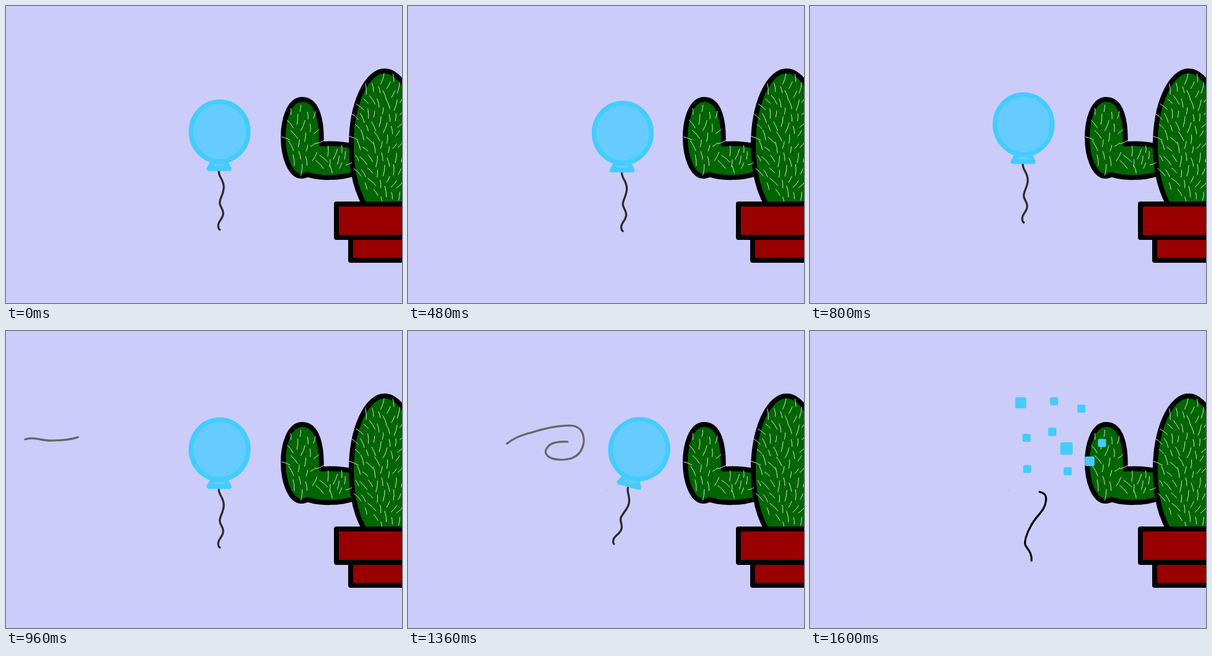
These frames come from a looping animation (640 px wide and 480 px high, 1.8 s). An HTML page:

```html
<!DOCTYPE html>
<html lang="en">
<head>
<meta charset="utf-8">
<title>Balloon and cactus</title>
<style>
html, body { margin: 0; width: 100%; height: 100%; overflow: hidden; background: #ccccfa; }
svg { display: block; width: 100%; height: 100%; }
path { stroke-linecap: round; stroke-linejoin: round; }
.outline { stroke: #000; stroke-width: 8; }
.line { fill: none; }
</style>
</head>
<body>
<svg viewBox="0 0 640 480">
  <g class="outline" fill="#060">
    <path d="M509.5 223C511 185 503 151 479 151C456 151 448 187 448 212C448 243 459 275 478 275Q483 275 487 272C505 279 540 279 562 271V227Q540 221 509.5 223Z"/>
    <ellipse cx="612" cy="225" rx="54" ry="120"/>
  </g>
  <path id="spines" class="line" stroke="#ddd"/>
  <g class="outline" fill="#900" stroke-linejoin="round">
    <rect x="557" y="374" width="120" height="37"/>
    <rect x="534" y="320" width="140" height="54"/>
  </g>

  <g class="line" stroke="#666" stroke-width="3.2">
    <path class="wind" pathLength="1" d="M31 175C45 170 58 178 75 177C105 177 125 172 140 157C156 141 158 122 153 106C149 95 138 97 128 97C113 98 104 114 105 125C106 134 114 132 121 133"/>
    <path class="wind" pathLength="1" d="M160 182C170 174 180 169 200 164C225 156 245 152 265 153C280 154 285 168 284 180C281 200 267 208 248 208C230 208 220 201 223 192C227 181 242 178 258 179"/>
  </g>

  <rect id="speck" x="320.5" y="256.5" width="1.5" height="1.5" fill="#7cf"/>

  <g id="balloon" fill="#6cf" stroke="#4cf" stroke-width="7.5">
    <path class="line" stroke="#2c2c2c" stroke-width="3.3" d="M344 267C343 276 352 280 352 293C352 303 345.5 311 345.5 318C345.5 325 351 327 351 335C351 344 343 347 343 355Q343 360 345.5 361.5"/>
    <path d="M334 252L328 263H361L355 252Z"/>
    <ellipse cx="345.3" cy="203" rx="46.3" ry="48.2"/>
  </g>

  <g id="burst" fill="#4cf">
    <path class="line" stroke="#000" stroke-width="3.2" d="M371 260C380 262 383 267 381 276C380 290 365 299 357 315C350 327 346 341 348 346C351 352 359 358 358 371"/>
  </g>
</svg>
<script>
const $ = id => document.getElementById(id);
const winds = document.querySelectorAll('.wind');

// Spines spread evenly over an oval, fanning out like a V
function spines(cx, cy, rx, ry, count) {
  let d = '';
  for (let i = 0; i < count; i++) {
    const r = Math.sqrt((i + 0.5) / count);
    const u = r * Math.cos(i * 2.4), v = r * Math.sin(i * 2.4);
    const a = Math.PI / 2 + u * (0.9 + 0.3 * v) + 0.4 * Math.sin(i * 7.3);
    const len = 7 + 2 * Math.sin(i * 3.7);
    const x = cx + rx * u, y = cy + ry * v;
    const dx = len * Math.cos(a), dy = len * Math.sin(a);
    d += `M${x - dx} ${y - dy}Q${x + dy / 6} ${y - dx / 6} ${x + dx} ${y + dy}`;
  }
  return d;
}
$('spines').setAttribute('d',
  spines(612, 215, 53, 105, 82) + spines(479, 212, 30, 56, 22) + spines(531, 249, 28, 20, 11));

// Scraps of the balloon, the largest first
const scraps = [
  [414.5, 190], [340.5, 116], [452, 210.5], [391.5, 163], [350, 172.5],
  [472, 181], [351, 223], [416.5, 226.5], [394.5, 113.5], [438.5, 125.5]
];
$('burst').insertAdjacentHTML('beforeend', scraps.map(([x, y], i) => {
  const s = Math.max(13.2, 20 - 2.2 * i);
  return `<rect x="${x - s / 2}" y="${y - s / 2}" width="${s}" height="${s}" rx="2.5"/>`;
}).join(''));

const GUST = 960, POP = 1600, LOOP = 1800;
const hover = [[0, 0], [0, -7.5], [1.7, 2.3], [0, -4.7], [0, -11.5]];
const gusts = [[GUST, 1160], [1200, 1440]];

// Rises from 0 to 1 in whole steps
function ramp(t, start, step, count) {
  return Math.min(1, Math.max(0, Math.floor((t - start) / step) / count));
}

function show(el, on) {
  el.style.display = on ? '' : 'none';
}

function draw(t) {
  const [hx, hy] = hover[4 * ramp(t, 160, 160, 4)];
  const lean = ramp(t, GUST, 80, 2);
  const drift = ramp(t, 1400, 40, 2);
  const x = hx + 28.3 * lean + 30 * drift, y = hy - 0.5 * lean;
  $('balloon').setAttribute('transform', `translate(${x} ${y}) rotate(${15 * lean} 345.3 203)`);

  winds.forEach((w, i) => {
    const [from, to] = gusts[i];
    show(w, t >= from && t < to);
    w.style.strokeDasharray = `${ramp(t, from - 80, 80, 3)} 2`;
  });

  show($('speck'), lean > 0);
  show($('balloon'), t < POP);
  show($('burst'), t >= POP);
}

const start = performance.now();
function tick() {
  draw((performance.now() - start) % LOOP);
  requestAnimationFrame(tick);
}
tick();
</script>
</body>
</html>
```
